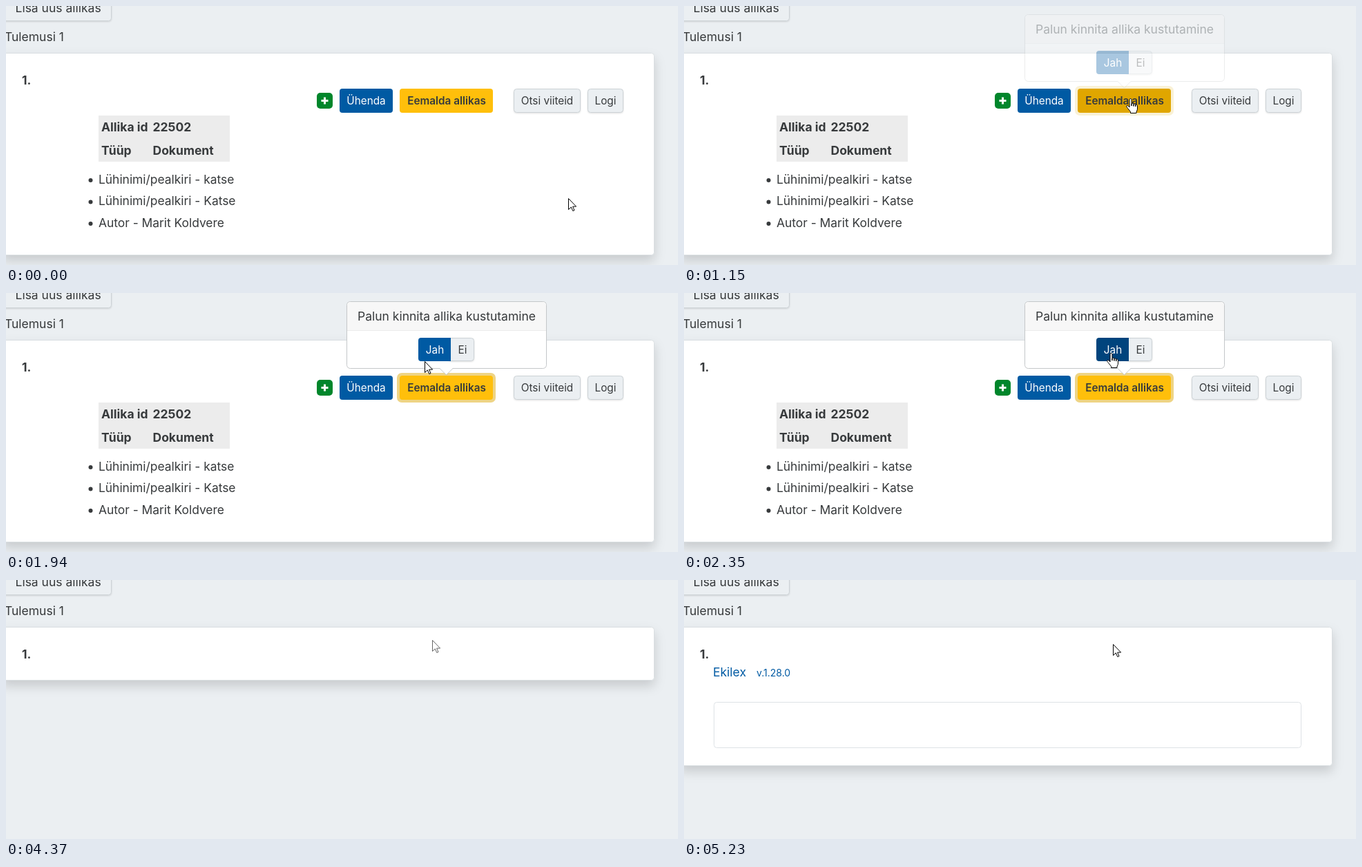
Write an HTML page that moves like this. It is 973 px wide and 376 px high and loops after 5.36 s.

```html
<!DOCTYPE html>
<html lang="et">
<head>
<meta charset="utf-8">
<title>Allika eemaldamine</title>
<style>
html, body { margin: 0; width: 100%; height: 100%; overflow: hidden; background: #ebeff2; }
svg { display: block; width: 973px; height: 376px; font: 17.5px Inter, sans-serif; fill: #373a3c; }
text { white-space: pre; }
.bold { font-weight: 700; }
.list { font-size: 17.4px; }
.small { font-size: 15.3px; text-anchor: middle; }
.semi { font-weight: 600; }
.white { fill: #fff; }
.link { fill: #005aa3; }
.light { fill: #ebeff2; stroke: #ccd2d6; }
.lift { filter: drop-shadow(0 1px 1px rgba(0, 0, 0, .12)); }
#card { fill: #fff; stroke: #d9dee1; filter: drop-shadow(0 8px 8px rgba(0, 0, 0, .15)); }
.line { fill: none; stroke: #dee2e6; }
#arrow, #hand { fill: #fff; stroke: #000; stroke-linejoin: round; }
</style>
</head>
<body>
<svg viewBox="0 0 973 376">
  <rect class="light lift" x="-5.5" y="-20.5" width="158" height="42" rx="4"/>
  <text x="13.5" y="8.5">Lisa uus allikas</text>
  <text x="-2" y="51">Tulemusi 1</text>

  <rect id="card" x="-5.5" y="68.5" width="944" rx="4"/>
  <text class="bold" x="23" y="114">1.</text>

  <g id="details">
    <rect x="450" y="126" width="23" height="23" rx="5" fill="#00862b"/>
    <path d="M456.5 137.5h10M461.5 132.500v10" stroke="#fff" stroke-width="3"/>
    <rect class="link" x="483" y="120" width="77" height="35" rx="4"/>
    <text class="small white" x="521.5" y="143">Ühenda</text>

    <rect id="ring" x="566" y="116" width="143" height="43" rx="7" fill="#eed485"/>
    <rect id="remove" x="570" y="120" width="135" height="35" rx="4"/>
    <text class="small semi" x="638" y="143">Eemalda allikas</text>

    <rect class="light lift" x="735.5" y="120.5" width="96" height="34" rx="4"/>
    <text class="small" x="783.5" y="143">Otsi viiteid</text>
    <rect class="light lift" x="842.5" y="120.5" width="51" height="34" rx="4"/>
    <text class="small" x="868" y="143">Logi</text>

    <rect x="134" y="159" width="190" height="67" fill="#ececec"/>
    <g class="bold">
      <text x="138" y="182">Allika id</text>
      <text x="212.5" y="182">22502</text>
      <text x="138" y="216">Tüüp</text>
      <text x="212.5" y="216">Dokument</text>
    </g>
    <g class="list">
      <circle cx="122.5" cy="253" r="3"/>
      <text x="134" y="258">Lühinimi/pealkiri - katse</text>
      <circle cx="122.5" cy="284.5" r="3"/>
      <text x="134" y="289">Lühinimi/pealkiri - Katse</text>
      <circle cx="122.5" cy="316" r="3"/>
      <text x="134" y="321">Autor - Marit Koldvere</text>
    </g>
  </g>

  <g id="footer">
    <text class="link" x="42" y="140">Ekilex</text>
    <text class="link" x="105" y="140" font-size="14">v.1.28.0</text>
    <rect class="line" x="43.5" y="177.5" width="850" height="66" rx="4"/>
  </g>

  <g id="popover">
    <rect x="493.5" y="12.5" width="289" height="97" rx="5" fill="#fff" stroke="#c4c7c9"/>
    <path d="M494 54V17.5a4.5 4.5 0 0 1 4.5-4.5h279a4.5 4.5 0 0 1 4.5 4.5V54z" fill="#f7f7f7"/>
    <path d="M494 54.5h288" stroke="#ebebeb"/>
    <path d="M628 109l9.5 9.5 9.5-9.5z" fill="#fff"/>
    <path d="M628 109.5l9.5 9.5 9.5-9.5" fill="none" stroke="#c4c7c9"/>
    <text x="638" y="40" text-anchor="middle">Palun kinnita allika kustutamine</text>
    <rect class="light lift" x="640.5" y="65.5" width="37" height="33" rx="4"/>
    <path id="yes" d="M644 65v34h-43a4 4 0 0 1-4-4v-26a4 4 0 0 1 4-4z"/>
    <text class="small white" x="621" y="88">Jah</text>
    <text class="small" x="661" y="88">Ei</text>
  </g>

  <g id="cursor">
    <path id="arrow" d="M.5 .5V16.5L4.3 12.9 6.8 18.5 9 17.5 6.600 12.1H11.6Z"/>
    <path id="hand" transform="translate(-5 0)" d="M6.5 21.5V19.5L2.5 14.5C1 12.5 .2 11.5 1 10.8 2 10 3.5 11 5 13V2C5 0 8 0 8 2V11 8C8.3 7 11 7 11 8.5V11.5 8.5C11.5 7.8 13.7 8 13.8 9.3V12 9.3C14.3 8.7 16.5 9 16.5 10.8V15C16.5 18 15 18.5 15 20V21.5Z"/>
  </g>
</svg>
<script>
const LOOP = 5360;
const TICK = 63;
const CLICK = 2550, CLOSED = 2700, CLEARED = 4370, REPLACED = 4960;

const $ = id => document.getElementById(id);
const show = (id, on) => $(id).style.display = on ? '' : 'none';
const mix = (from, to, k) => `color-mix(in srgb, ${to} ${k * 100}%, ${from})`;
const linear = k => k;
const easeOut = k => 1 - (1 - k) ** 2;

// Progress from 0 to 1 in whole ticks, the first one taken at the start time.
const progress = (t, start, ticks) =>
  Math.min(1, Math.max(0, Math.floor((t - start) / TICK) + 1) / ticks);
const fade = (t, start) => progress(t, start, 3);

const home = { x: 814, y: 279 };
const moves = [
  { start: 130, ticks: 3, x: 650, y: 250, ease: linear },
  { start: 540, ticks: 7, x: 645, y: 134, ease: easeOut },
  { start: 1750, ticks: 4, x: 606, y: 99, ease: easeOut },
  { start: 2010, ticks: 4, x: 614, y: 89, ease: easeOut },
  { start: 2350, ticks: 1, x: 617, y: 87, ease: linear },
  { start: 5160, ticks: 2, x: 621, y: 93, ease: linear }
];

function pointerAt(t) {
  let { x, y } = home;
  for (const move of moves) {
    const k = move.ease(progress(t, move.start, move.ticks));
    x += (move.x - x) * k;
    y += (move.y - y) * k;
  }
  return { x: Math.round(x), y: Math.round(y) };
}

function draw(t) {
  const { x, y } = pointerAt(t);
  const overRemove = x >= 570 && x < 705 && y >= 120 && y < 155;
  const overYes = x >= 597 && x < 644 && y >= 65 && y < 99 && t < CLOSED;
  const pointing = overRemove || overYes;
  $('cursor').setAttribute('transform', `translate(${x} ${y})`);
  show('hand', pointing);
  show('arrow', !pointing);
  $('arrow').style.stroke = t >= CLOSED && t < 5160 ? '#666' : '#000';

  $('popover').style.opacity = $('ring').style.opacity = fade(t, 1150) - fade(t, CLICK);
  $('remove').style.fill = mix('#ffbf0b', '#e0a600', fade(t, 810) - fade(t, 1800));
  $('yes').style.fill = mix('#005aa3', '#00447d', fade(t, 2010));

  $('card').setAttribute('height', t < CLEARED ? 293 : t < REPLACED ? 77 : 201);
  show('details', t < CLEARED);
  show('footer', t >= REPLACED);
}

const start = performance.now();
function frame() {
  draw((performance.now() - start) % LOOP);
  requestAnimationFrame(frame);
}
frame();
</script>
</body>
</html>
```
